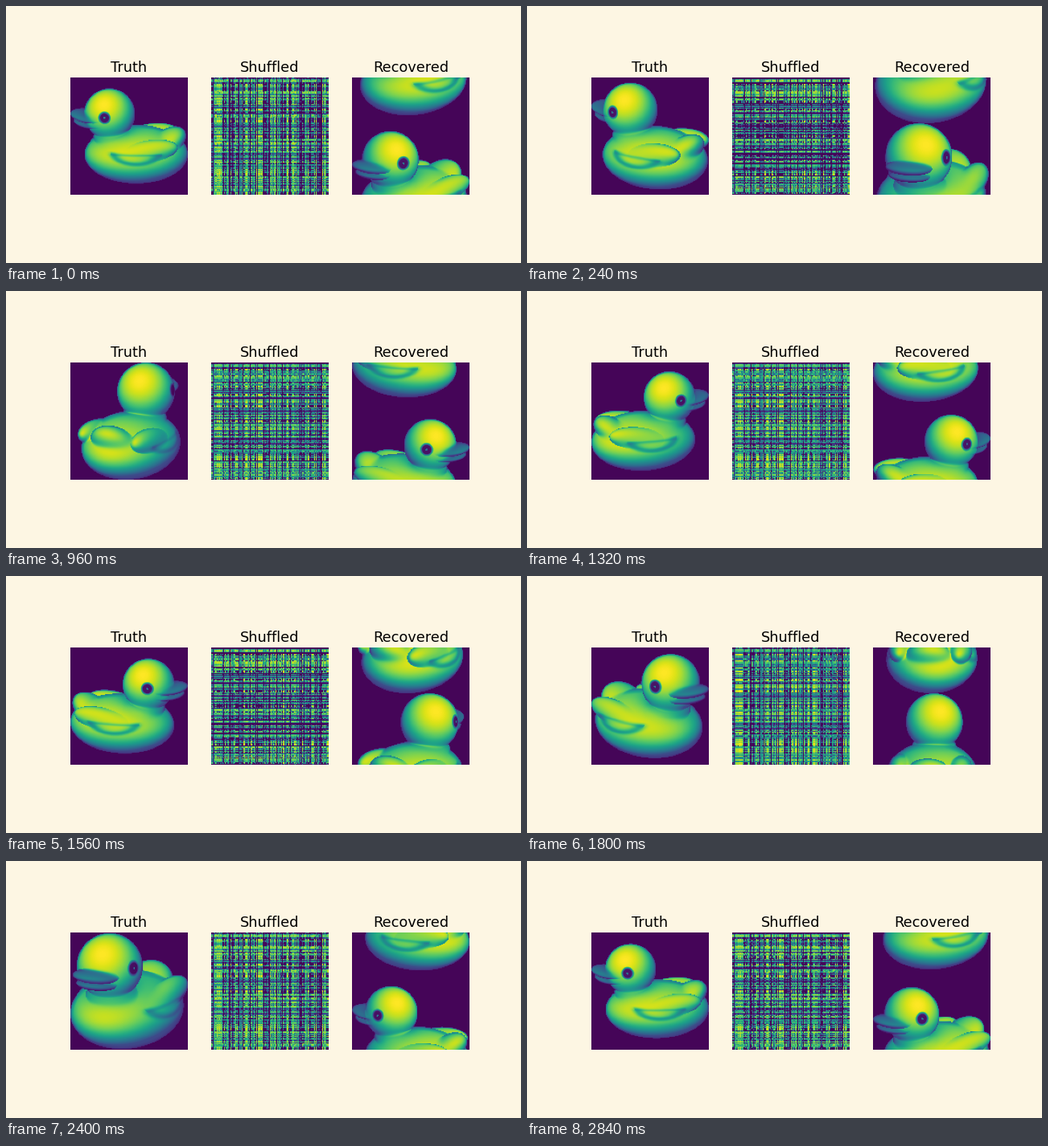
Animation, 640 px wide and 320 px high, one loop 2880 ms. Source, as a matplotlib script:

```python
import numpy as np
import matplotlib.pyplot as plt
from matplotlib.animation import FuncAnimation

N = 128            # cells per side of each panel
STEPS = 72         # one full turn
PITCH = np.radians(18)
LIGHT = np.array([-0.22, 0.36, 0.9])
LIGHT /= np.linalg.norm(LIGHT)
BACKDROP = 0.012
BLEND = 0.11       # softness of the joints
EYE_TURN = np.radians(78)


def blob(centre, radii, tilt=0.0, tone=1.0):
    """Ellipsoid tilted in the forward-up plane."""
    c, s = np.cos(tilt), np.sin(tilt)
    turned = np.array([[c, 0, -s], [0, 1, 0], [s, 0, c]])
    return np.array(centre), turned * np.array(radii), tone


def build_duck():
    """Axes are forward, left, up; the head is the unit sphere at the origin."""
    head = blob((0, 0, 0), (1, 1, 1))
    neck = blob((-0.15, 0, -0.95), (0.78, 0.8, 0.5), tone=0.92)
    body = blob((-1.05, 0, -1.67), (2.03, 1.6, 1.1), tone=0.96)
    tail = blob((-2.25, 0, -1.2), (0.85, 0.8, 0.5), -0.6, 0.92)
    wings = [blob((-1.6, side, -1.2), (1.1, 0.42, 0.44), -0.15, 0.93)
             for side in (1.05, -1.05)]
    beak = [blob((0.85 - 0.05 * k, 0, -0.08 - 0.27 * k),
                 (0.7 - 0.08 * k, 0.7 - 0.08 * k, 0.21 - 0.04 * k),
                 0.15, 0.48 - 0.05 * k) for k in (0, 1)]
    return [head, neck, body, tail, *wings, *beak]


DUCK = build_duck()


def view(theta):
    """Rows give screen x, screen y and depth towards the viewer."""
    c, s = np.cos(theta), np.sin(theta)
    cp, sp = np.cos(PITCH), np.sin(PITCH)
    return np.array([[-c, -s, 0],
                     [s * sp, -c * sp, cp],
                     [-s * cp, c * cp, sp]])


def fit(parts):
    """Square window around all blobs: centre and side."""
    lo = np.min([c[:2] - np.linalg.norm(a[:2], axis=1) for c, a, _ in parts], axis=0)
    hi = np.max([c[:2] + np.linalg.norm(a[:2], axis=1) for c, a, _ in parts], axis=0)
    return (lo + hi) / 2, np.max(hi - lo)


def trace(part, x, y):
    """Depth and normal of one blob under every cell."""
    c, a, _ = part
    inv = np.linalg.inv(a)
    q = np.tensordot(inv[:, :2], np.stack([x - c[0], y - c[1]]), 1)
    b = inv[:, 2]
    half = np.tensordot(b, q, 1)
    disc = half ** 2 - b @ b * ((q ** 2).sum(0) - 1)
    z = (-half + np.sqrt(np.maximum(disc, 0))) / (b @ b)
    n = np.tensordot(inv.T, q + z * b[:, None, None], 1)
    return np.where(disc > 0, z + c[2], -50), n / np.linalg.norm(n, axis=0)


def ramp(v, start, width):
    return np.clip((v - start) / width, 0, 1)


def paint(val, point, off_head):
    """Shade under the head, folded wings on the flanks, and the eyes."""
    f, s, u = point
    gap = np.maximum(np.sqrt(f ** 2 + s ** 2 + u ** 2) - 1, 0)
    val = val * (1 - 0.3 * off_head * np.exp(-gap / 0.3))

    flank = ramp(np.abs(s), 0.8, 0.4) * (u < -0.75)
    q = ((f + 1.05) / 1.02) ** 2 + ((u + 1.2) / 0.42) ** 2
    arc = np.exp(-((q - 0.8) / 0.35) ** 2) * ramp(-u, 1.15, 0.15)
    fold = np.exp(-((u + 1.25) / 0.05) ** 2) * (q < 1)
    val = val * (1 - flank * (0.33 * arc + 0.17 * fold))

    for turn in (EYE_TURN, -EYE_TURN):
        d = np.sqrt((f - np.cos(turn)) ** 2 + (s - np.sin(turn)) ** 2
                    + (u - 0.15) ** 2)
        val = val * (0.06 + 0.94 * ramp(d, 0.17, 0.1))
        val = np.where(d < 0.035, 0.5, val)
    return np.clip(val, 0, 1)


def render(theta):
    v = view(theta)
    parts = [(v @ c, v @ a, tone) for c, a, tone in DUCK]
    (cx, cy), size = fit(parts)
    grid = ((np.arange(N) + 0.5) / N - 0.5) * size
    x, y = np.meshgrid(cx + grid, cy - grid)

    depths, normals = map(np.array, zip(*(trace(p, x, y) for p in parts)))
    top = depths.max(0)
    w = np.exp((depths - top) / BLEND)
    w /= w.sum(0)
    n = (w[:, None] * normals).sum(0)
    n /= np.linalg.norm(n, axis=0) + 1e-9
    tone = np.tensordot([p[2] for p in parts], w, 1)

    lit = np.clip(np.tensordot(LIGHT, n, 1), 0, 1)
    val = tone * (0.23 + 0.77 * lit ** 0.95)
    val *= 0.48 + 0.52 * ramp(n[2], 0, 0.35)
    point = np.tensordot(v.T, np.stack([x, y, top]), 1)
    return np.where(top > -40, paint(val, point, 1 - w[0]), BACKDROP)


turns = [render(2 * np.pi * i / STEPS) for i in range(STEPS)]
rng = np.random.default_rng(7)
rows, cols, order = (rng.permutation(k) for k in (N, N, STEPS))


def panels(i):
    """The turn, its scramble in space and time, and the reversed, rolled copy."""
    scrambled = turns[order[i]][rows][:, cols]
    mirrored = turns[(i + 44) % STEPS][:, ::-1]
    return turns[i], scrambled, np.roll(mirrored, 50, axis=0)


fig, axs = plt.subplots(1, 3, figsize=(8, 4), dpi=80, facecolor="#fdf6e3")
images = []
for ax, title, data in zip(axs, ("Truth", "Shuffled", "Recovered"), panels(0)):
    images.append(ax.imshow(data, cmap="viridis", vmin=0, vmax=1))
    ax.set_title(title, fontsize=16)
    ax.axis("off")


def update(i):
    for image, data in zip(images, panels(i)):
        image.set_data(data)
    return images


anim = FuncAnimation(fig, update, frames=STEPS, interval=40, repeat=True)
plt.show()
```
